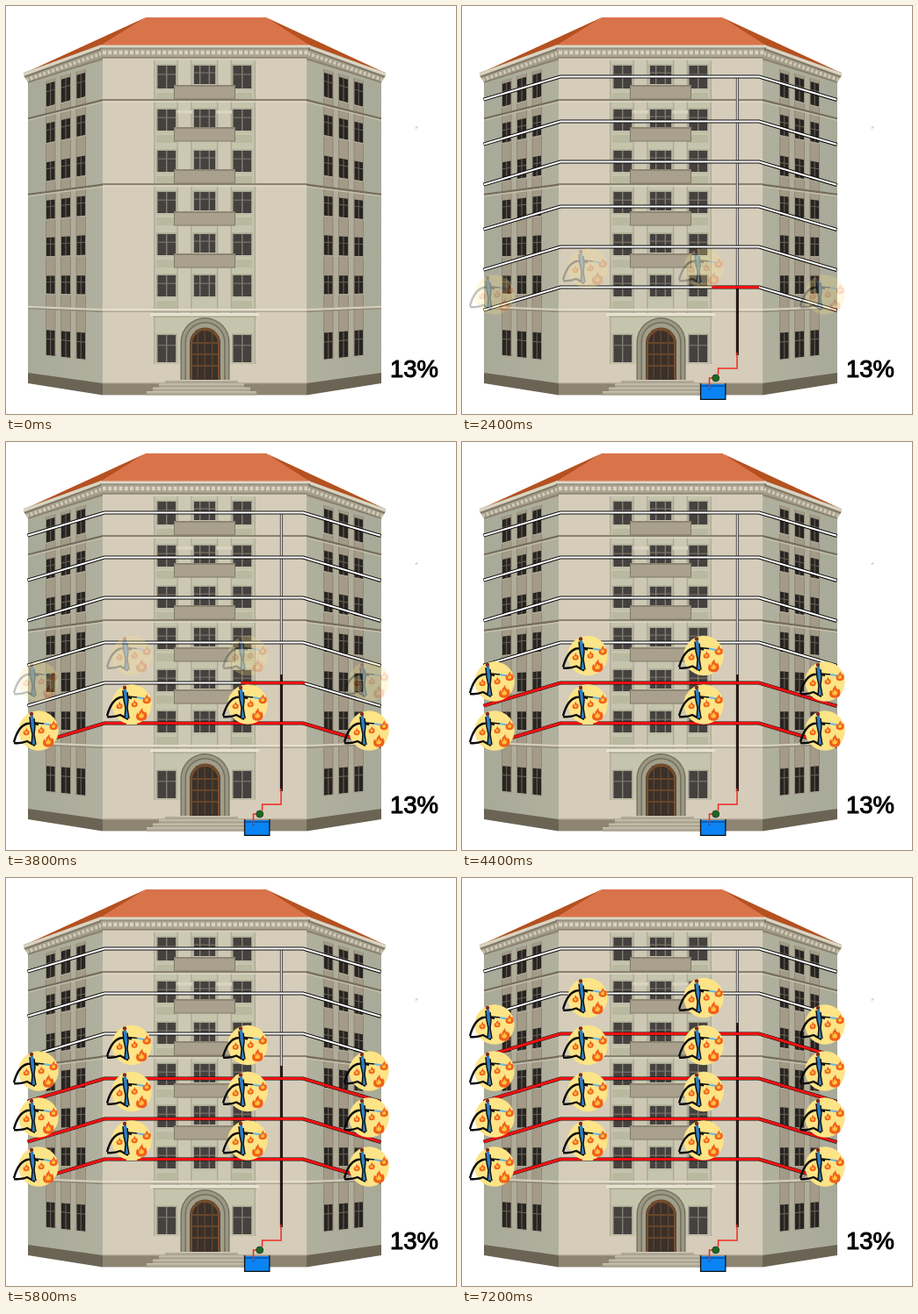
An HTML page that plays this animation: 512x465 px, repeating every 8 s.

```html
<!DOCTYPE html>
<html lang="en">
<head>
<meta charset="utf-8">
<title>Building riser</title>
<style>
html, body { margin: 0; width: 100%; height: 100%; overflow: hidden; background: #fff; }
svg { display: block; width: 512px; height: 465px; }
</style>
</head>
<body>
<svg id="stage" viewBox="0 0 512 465" xmlns="http://www.w3.org/2000/svg">
  <defs>
    <linearGradient id="sideWall"><stop offset="0" stop-color="#a8aa99"/><stop offset="1" stop-color="#b0b09e"/></linearGradient>
    <g id="badge">
      <circle r="22.7" fill="#fde486"/>
      <path d="M-28 13C-25 2 -20 -6 -13 -8Q-6 -9 0 -7" fill="none" stroke="#0b0b0b" stroke-width="2.4"/>
      <path d="M-28 14Q-20 15 -13 12L-4 17" fill="none" stroke="#0b0b0b" stroke-width="2.4"/>
      <path d="M-9 -17L-6 -17L-4 -6L-5 4L-4 15L-7 16L-7 3L-9 -7Z" fill="#2b7fc8"/>
      <path d="M-10 -16L-9 -5L-7 4L-8 16M-5 -14L-4 -5L-5 4L-3 16" fill="none" stroke="#111" stroke-width="1.5"/>
      <path d="M-4 -9L6 -8" fill="none" stroke="#111" stroke-width="1.5"/>
      <path d="M6 -8L17 -6" fill="none" stroke="#6fb4dd" stroke-width="1.8"/>
      <circle cx="-8" cy="-19" r="2.2" fill="#7c2a22"/>
    </g>
  </defs>
  <g id="house"></g>
  <path d="M466.5 140V138H469" fill="none" stroke="#c4c4c4" stroke-width="1"/>
  <text x="437" y="423" font-family="'Liberation Sans', Arial, sans-serif" font-size="27.5" stroke="#000" stroke-width="1">13%</text>
  <g id="pipes"></g>
  <g id="pump">
    <rect x="271.5" y="431" width="28" height="17" fill="#0a84f4"/>
    <path d="M271.5 430V448.3H299.8V430" fill="none" stroke="#111" stroke-width="1.3"/>
    <path d="M271 433H300" stroke="#123a70" stroke-width="1"/>
    <path d="M281.5 434V424H289M291.5 420V413H313V395" fill="none" stroke="#f42a22" stroke-width="1.5"/>
    <path d="M279.5 435L281.5 438L283.5 435Z" fill="#2a62a8"/>
    <circle cx="288.7" cy="424" r="4" fill="#156b1c" stroke="#333" stroke-width=".8"/>
  </g>
  <g id="badges"></g>
</svg>
<script>
const NS = 'http://www.w3.org/2000/svg';
const $ = id => document.getElementById(id);

function add(parent, tag, attrs) {
  const el = document.createElementNS(NS, tag);
  for (const k in attrs) el.setAttribute(k, attrs[k]);
  parent.appendChild(el);
  return el;
}
const poly = (g, points, fill) => add(g, 'polygon', { points, fill });
const rect = (g, x, y, width, height, fill) => add(g, 'rect', { x, y, width, height, fill });
const line = (g, d, stroke, w, extra) =>
  add(g, 'path', { d, fill: 'none', stroke, 'stroke-width': w, ...extra });

// Height on the receding left wall for a level y of the front wall
const recede = (x, y) => y + (110 - x) / 85 * (26 - (y - 60) * 0.1027);
const slab = (g, x1, x2, y1, y2, fill) => poly(g,
  `${x1},${recede(x1, y1)} ${x2},${recede(x2, y1)} ${x2},${recede(x2, y2)} ${x1},${recede(x1, y2)}`, fill);

function drawSide(g) {
  slab(g, 25, 110, 58, 431, 'url(#sideWall)');
  const cols = [[46, 55.5], [63, 73], [80.5, 90]];
  slab(g, 55.5, 63, 66, 403, '#b0ad9a');
  slab(g, 73, 80.5, 66, 403, '#b0ad9a');
  for (const [a, b] of cols) {
    slab(g, a - 1, b + 1, 66, 406, '#8f8977');
    slab(g, a, b, 66, 406, '#a39a87');
  }
  const rows = [[70, 98], [119, 143], [167, 190], [214, 237], [260, 283], [307, 329], [374, 405]];
  for (const [top, bot] of rows) for (const [a, b] of cols) {
    const mid = (a + b) / 2, bar = top + (bot - top) * 0.33;
    slab(g, a, b, top, bot, '#282422');
    slab(g, mid - 0.5, mid + 0.5, top, bot, '#6d665b');
    slab(g, a, b, bar, bar + 1, '#6d665b');
    slab(g, a - 1, b + 1, bot, bot + 1.5, '#aca694');
  }
  for (const y of [106, 202.5]) {
    slab(g, 25, 110, y, y + 2.4, '#746d5e');
    slab(g, 25, 110, y + 2.4, y + 4, '#c5c0ae');
  }
  slab(g, 25, 110, 345, 347.5, '#d2cdbc');
  slab(g, 25, 110, 347.5, 349, '#8f8977');
  slab(g, 25, 110, 430, 443.5, '#6b6455');
  poly(g, '108,44 20,76 20,79 25,87 110,62', '#a29b88');
  line(g, 'M108 46L20 78', '#dcd5c2', 3);
  line(g, 'M108 49L21 81', '#6f6858', 1.2);
  line(g, 'M109 54L24 84', '#cfc9b7', 4, { 'stroke-dasharray': '3.2 2' });
  line(g, 'M110 60L25 87', '#857d6c', 1.5);
}

function drawWindow(g, x, y, w, h, bars) {
  rect(g, x - 1.5, y - 1.5, w + 3, h + 3, '#a9a592');
  rect(g, x, y, w, h, '#45413f');
  for (const k of bars) rect(g, x + w * k - 0.6, y, 1.2, h, '#8f8a7c');
  rect(g, x, y + h * 0.36, w, 1.1, '#7d786c');
  rect(g, x - 2, y + h, w + 4, 1.5, '#c4bfab');
}

function drawFront(g) {
  rect(g, 110, 55, 232, 377, '#d5cdba');
  rect(g, 168, 62, 116, 346, '#c4c5ac');
  for (const x of [194.5, 240]) {
    rect(g, x, 62, 17, 290, '#cdc8b3');
    rect(g, x, 62, 1.3, 290, '#aaa793');
    rect(g, x + 15.7, 62, 1.3, 290, '#aaa793');
    rect(g, x - 2, 119, 21, 3.5, '#d9d3c2');
  }
  for (const x of [168, 282.5]) rect(g, x, 62, 1.5, 346, '#b1ac98');

  const tops = [68, 118, 165, 212, 260, 307];
  tops.forEach((y, i) => {
    const h = i ? 24 : 26;
    for (const x of [172.5, 258.5]) {
      drawWindow(g, x, y, 20.5, h, [0.5]);
      rect(g, x - 1.5, y + h + 5, 23, 9, '#b9b9a0');
    }
    drawWindow(g, 214, y, 24, i < 5 ? 21 : 24, [0.28, 0.72]);
  });
  for (const x of [172.5, 258.5]) drawWindow(g, x, 375, 20.5, 31, [0.5]);

  for (const y of [106, 202]) {
    rect(g, 110, y, 232, 2.4, '#8b8370');
    rect(g, 110, y + 2.4, 232, 1.4, '#e2dbc9');
  }
  rect(g, 110, 345, 232, 2.5, '#e6dfcd');
  rect(g, 110, 347.5, 232, 1.3, '#a9a28f');

  for (let i = 0; i < 5; i++) {
    const y = 90 + i * 48;
    rect(g, 191, y, 70, 16.5, '#807967');
    rect(g, 192, y + 1.5, 68, 14, '#a9a18e');
    rect(g, 191, y, 70, 1.6, '#8b8471');
  }

  rect(g, 110, 430, 232, 13.4, '#8d8472');
  rect(g, 110, 429, 232, 1.5, '#b5ad9a');

  // Entrance
  rect(g, 164, 350, 124, 3.5, '#e8e2d2');
  rect(g, 167, 353.5, 118, 1.3, '#aba591');
  const arch = (r, top, fill) => add(g, 'path', {
    d: `M${226.5 - r} 426V${top + r}A${r} ${r} 0 0 1 ${226.5 + r} ${top + r}V426Z`, fill });
  arch(28, 355, '#77735f');
  arch(26.5, 356.5, '#9b9783');
  arch(23, 360, '#737060');
  arch(21.5, 361.5, '#a29e8a');
  arch(17.5, 366.5, '#5c4a36');
  arch(16.5, 367.5, '#7a4c28');
  arch(14.5, 370, '#39312c');
  for (const x of [217.5, 225.5, 234]) rect(g, x, 370, 1.3, 55, '#65452b');
  for (const y of [383, 396, 409]) rect(g, 212, y, 29, 2, '#65452b');

  for (let i = 0; i < 4; i++) {
    const x = 181 - i * 7, y = 426 + i * 4.4;
    rect(g, x, y, 2 * (222.5 - x), 4.4, '#aca592');
    rect(g, x, y, 2 * (222.5 - x), 1.3, '#cfc8b6');
  }

  rect(g, 107, 44.5, 239, 3, '#ded7c5');
  rect(g, 107, 47.5, 239, 1.3, '#756e5e');
  rect(g, 108, 48.8, 236, 10.5, '#aaa390');
  line(g, 'M110 53H343', '#dad3c1', 4.5, { 'stroke-dasharray': '4 2.2' });
  rect(g, 109, 58, 234, 1.6, '#8b8370');
}

function drawRoof(g) {
  poly(g, '159,13 22,76 108,46', '#b5511f');
  poly(g, '296,13 431,76 344,46', '#b5511f');
  poly(g, '159,13 296,13 346,45 107,45', '#d9734a');
}

const house = $('house');
drawRoof(house);
drawSide(add(house, 'g', {}));
drawSide(add(house, 'g', { transform: 'translate(452 0) scale(-1 1)' }));
drawFront(add(house, 'g', {}));

// Pipes: one branch per floor, all fed by the riser
const pipes = $('pipes');
const LEFT = 25, BEND_L = 112, BEND_R = 338, RIGHT = 426, RISER = 313.3;

function branch(y, x1, x2) {
  const at = x => x < BEND_L ? y + (BEND_L - x) * 0.299
                : x > BEND_R ? y + (x - BEND_R) * 0.299 : y;
  const xs = [x1, ...[BEND_L, BEND_R].filter(x => x > x1 && x < x2), x2];
  return 'M' + xs.map(x => `${x} ${at(x)}`).join('L');
}

const floors = [80.5, 131.5, 177.5, 228.5, 274.5, 320.5];
line(pipes, `M${RISER} 80V398`, '#333', 3);
line(pipes, `M${RISER} 80V398`, '#e9e6df', 1.3);
for (const y of floors) {
  line(pipes, branch(y, LEFT - 0.5, RIGHT + 0.5), '#0c0c0c', 4);
  line(pipes, branch(y, LEFT, RIGHT), '#fff', 2);
}
const wetDark = line(pipes, '', '#120a0a', 2.6);
const wetCore = line(pipes, '', '#7c1212', 0.7);

// Each stage wets one branch and reveals its row of badges
const badges = $('badges');
const stages = [
  { at: 2400, pipe: 320.5, rise: 320, from: 284, to: 338, front: 299, side: 329 },
  { at: 3800, pipe: 274.5, rise: 265, from: 267, to: 340, front: 243.5, side: 273 },
  { at: 5200, pipe: 228.5, rise: 214, from: 286, to: 362, front: 190.5, side: 220 },
  { at: 6600, pipe: 177.5, rise: 165, from: 286, to: 340, front: 136.5, side: 167 }
];

function flame(g, x, y, s) {
  const put = (k, fill) => add(g, 'path', { fill,
    transform: `translate(${x} ${y}) scale(${s * k})`,
    d: 'M0 5C-6 5 -6 0 -4 -3L-2 -1C-3 -4 0 -6 1 -8Q1 -4 4 -3L4 -5C7 0 6 5 0 5Z' });
  put(1, '#f0601c');
  put(0.45, '#ffc23c');
}
for (const f of [[-14, 2, 0.65], [3, 0, 0.65], [17, -5, 0.85], [11, 13, 1.15]])
  flame($('badge'), ...f);

for (const s of stages) {
  s.wet = line(pipes, '', '#f01010', 2.9);
  s.row = add(badges, 'g', {});
  if (s.at === 2400) rect(s.row, 137, 318, 12, 4, '#fde486');
  for (const [x, y] of [[37, s.side], [143, s.front], [275, s.front], [413, s.side]])
    add(s.row, 'use', { href: '#badge', x, y });
}

const LOOP = 8000;
const steps = (t, start, gap) => Math.max(0, Math.min(4, Math.floor((t - start) / gap) + 1));
const lerp = (a, b, k) => a + (b - a) * k;

function draw(t) {
  $('pump').setAttribute('opacity', steps(t, 500, 50) / 4);
  pipes.setAttribute('opacity', steps(t, 1450, 50) / 4);
  let top = 398;
  for (const s of stages) {
    const n = steps(t, s.at, 200), k = (n - 1) / 3;
    s.row.setAttribute('opacity', n / 4);
    s.wet.setAttribute('d', n ? branch(s.pipe, lerp(s.from, LEFT, k), lerp(s.to, RIGHT, k)) : '');
    if (n) top = s.rise;
  }
  const d = top < 398 ? `M${RISER} ${top}V398` : '';
  wetDark.setAttribute('d', d);
  wetCore.setAttribute('d', d);
}

const t0 = performance.now();
function tick() {
  draw((performance.now() - t0) % LOOP);
  requestAnimationFrame(tick);
}
draw(0);
requestAnimationFrame(tick);
</script>
</body>
</html>
```
